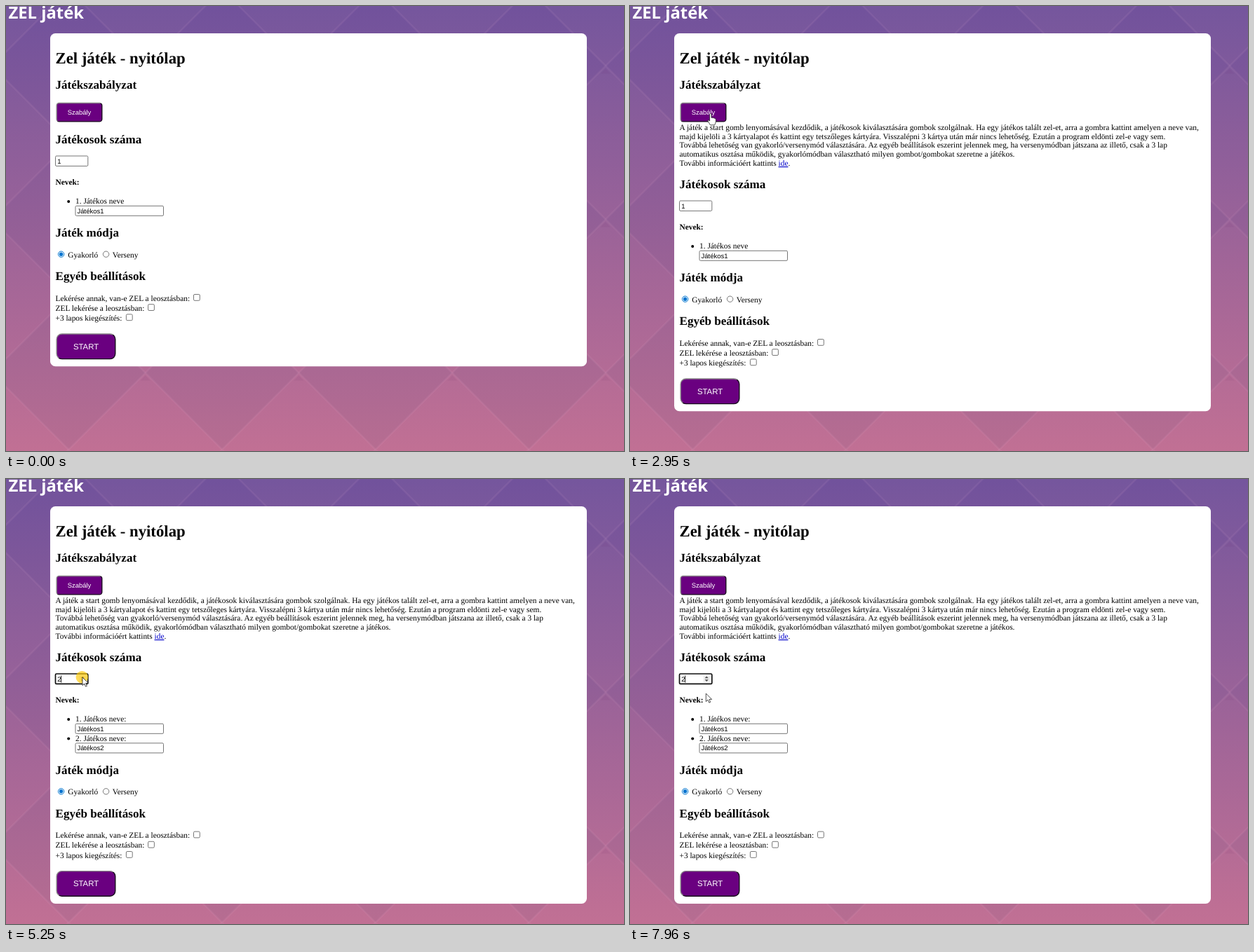
An HTML page that plays this animation: 881x635 px, repeating every 8 s.

```html
<!DOCTYPE html>
<html lang="hu">
<head>
<meta charset="utf-8">
<style>
  html, body { margin: 0; width: 100%; height: 100%; overflow: hidden; background: #91609a; }
  svg { display: block; width: 100vw; height: 100vh; text-rendering: geometricPrecision; }
  text { font: 11.38px "Liberation Serif", "Times New Roman", serif; white-space: pre; }
  .title { font: 700 23.8px "Open Sans", sans-serif; fill: #fff; }
  .h1 { font-size: 22.75px; font-weight: 700; }
  .h2 { font-size: 17.07px; font-weight: 700; }
  .bold { font-weight: 700; }
  .ui { font: 9.48px "Liberation Sans", Arial, sans-serif; }
  .cap { fill: #fff; text-anchor: middle; }
  .big { font-size: 11.38px; }
  .link { fill: #0000c8; text-decoration: underline; }
  .field { fill: #fff; stroke: #767676; }
</style>
</head>
<body>
<svg id="stage" viewBox="0 0 881 635" preserveAspectRatio="none">
  <defs>
    <linearGradient id="sky" gradientUnits="userSpaceOnUse" x1="0" y1="0" x2="0" y2="635">
      <stop stop-color="#71529c"/><stop offset="1" stop-color="#b76d91"/>
    </linearGradient>
    <linearGradient id="facet" gradientUnits="userSpaceOnUse" x1="0" y1="0" x2="0" y2="635">
      <stop stop-color="#75569d"/><stop offset="1" stop-color="#c17094"/>
    </linearGradient>
    <linearGradient id="outset" x2="1" y2="1">
      <stop offset=".5" stop-color="#858085"/><stop offset=".5" stop-color="#180a1c"/>
    </linearGradient>
    <linearGradient id="inset" x2="1" y2="1">
      <stop offset=".5" stop-color="#180a1c"/><stop offset=".5" stop-color="#858085"/>
    </linearGradient>
  </defs>
  <rect width="881" height="635" fill="url(#sky)"/>
  <g id="facets"></g>
  <rect id="card" x="63" y="39" width="765" rx="7.5" fill="#fff"/>
  <g id="head"></g>
  <g id="rules"></g>
  <g id="players"></g>
  <g id="options"></g>
  <circle id="ring" r="8.8" fill="#ffc800" fill-opacity=".66"/>
  <g id="pointer">
    <path id="arrow" d="M0 0V11.6L2.7 9.1 4.5 13.2 6.4 12.4 4.7 8.4H8.3Z" fill="#fff" stroke="#222" stroke-width=".8"/>
    <path id="hand" d="M-1.2 1Q0-.6 1.2 1V6.5Q2.5 5.6 3.4 6.8 4.8 6 5.6 7.4 7.4 6.8 7.6 9V12Q7 14 6 16.8H-.5Q-1.5 14.5-4 11-4.2 8.8-1.2 11Z" fill="#fff" stroke="#222" stroke-width=".8"/>
    <path id="beam" d="M-2.5-5.5H2.5M0-5.5V5.5M-2.5 5.5H2.5" fill="none" stroke="#222"/>
  </g>
</svg>
<script>
const LOOP = 8000, RULES_SHIFT = 64, ROW = 27.6;
const $ = id => document.getElementById(id);

function add(parent, tag, attrs, content = '') {
  const el = document.createElementNS('http://www.w3.org/2000/svg', tag);
  for (const key in attrs) el.setAttribute(key, attrs[key]);
  el.textContent = content;
  return parent.appendChild(el);
}
const label = (parent, x, y, content, cls = '') => add(parent, 'text', { x, y, class: cls }, content);
const box = (parent, x, y, width, height, rx = 1.5) =>
  add(parent, 'rect', { x, y, width, height, rx, class: 'field' });

function button(parent, x, y, width, height, rx, caption, cls) {
  const face = add(parent, 'rect', { x, y, width, height, rx, fill: '#6a0080', stroke: 'url(#outset)', 'stroke-width': 1.4 });
  label(parent, x + width / 2, y + height / 2 + (cls ? 4.1 : 3.5), caption, 'ui cap ' + cls);
  return face;
}

// Background lattice
for (let cx = -20; cx < 990; cx += 218.7) {
  for (let cy = -24; cy < 700; cy += 219) {
    const h = 109.5;
    add($('facets'), 'path', {
      d: `M${cx} ${cy - h}l${h} ${h}l${-h} ${h}l${-h} ${-h}z`,
      fill: 'url(#facet)', stroke: '#ffc0d8', 'stroke-opacity': .07, 'stroke-width': 2.5
    });
    add($('facets'), 'path', { d: `M${cx} ${cy - h + 4}l7 7h-14z`, fill: '#602060', 'fill-opacity': .07 });
  }
}

// Fixed top part
const head = $('head');
label(head, 3.5, 18, 'ZEL játék', 'title');
label(head, 70.5, 82, 'Zel játék - nyitólap', 'h1');
label(head, 70.5, 118, 'Játékszabályzat', 'h2');
const ruleButton = button(head, 72.2, 138.5, 64.6, 26.4, 3.5, 'Szabály', '');

// Rules paragraph
[
  'A játék a start gomb lenyomásával kezdődik, a játékosok kiválasztására gombok szolgálnak. Ha egy játékos talált zel-et, arra a gombra kattint amelyen a neve van,',
  'majd kijelöli a 3 kártyalapot és kattint egy tetszőleges kártyára. Visszalépni 3 kártya után már nincs lehetőség. Ezután a program eldönti zel-e vagy sem.',
  'Továbbá lehetőség van gyakorló/versenymód választására. Az egyéb beállítások eszerint jelennek meg, ha versenymódban játszana az illető, csak a 3 lap',
  'automatikus osztása működik, gyakorlómódban választható milyen gombot/gombokat szeretne a játékos.',
  'További információért kattints '
].forEach((line, i) => {
  const row = label($('rules'), 70.5, 176.8 + 12.8 * i, line);
  if (i === 4) {
    add(row, 'tspan', { class: 'link' }, 'ide');
    add(row, 'tspan', {}, '.');
  }
});

// Player count and names
const players = $('players');
label(players, 70.5, 196, 'Játékosok száma', 'h2');
const countBox = box(players, 70.5, 214, 46.3, 14.4);
const spinner = add(players, 'g', {});
add(spinner, 'rect', { x: 104.5, y: 216, width: 9.5, height: 10.5, fill: '#efefef' });
add(spinner, 'path', { d: 'M106.5 220.3l2.7-2.8 2.7 2.8zM106.5 222.3l2.7 2.8 2.7-2.8z', fill: '#505050' });
const count = label(players, 73.2, 224.6, '1', 'ui');
const caret = add(players, 'path', { d: 'M78.6 216.5v10', stroke: '#000', 'stroke-width': .9 });
label(players, 70.5, 254.5, 'Nevek:', 'bold');
const rows = [1, 2, 3].map(n => {
  const g = add(players, 'g', { transform: `translate(0 ${ROW * (n - 1)})` });
  add(g, 'circle', { cx: 89.2, cy: 279, r: 2 });
  const name = label(g, 99, 282.3, '');
  const field = box(g, 99, 285.3, 125.5, 14);
  label(g, 101.5, 295.6, 'Játékos' + n, 'ui');
  return { g, name, field, n };
});

// Mode, settings and start
const options = $('options');
label(options, 70.5, 329, 'Játék módja', 'h2');
add(options, 'circle', { cx: 78.6, cy: 354.2, r: 4.2, fill: '#fff', stroke: '#0075d0', 'stroke-width': 1 });
add(options, 'circle', { cx: 78.6, cy: 354.2, r: 2.7, fill: '#0075d0' });
label(options, 88.2, 358.7, 'Gyakorló');
add(options, 'circle', { cx: 142.6, cy: 354.2, r: 4.2, class: 'field' });
label(options, 151.8, 358.7, 'Verseny');
label(options, 70.5, 391, 'Egyéb beállítások', 'h2');
[
  ['Lekérése annak, van-e ZEL a leosztásban:', 267.5],
  ['ZEL lekérése a leosztásban:', 202.6],
  ['+3 lapos kiegészítés:', 171.4]
].forEach(([caption, x], i) => {
  label(options, 70.5, 420.6 + 14.2 * i, caption);
  box(options, x, 411.5 + 14.2 * i, 8.8, 8.8);
});
button(options, 72.2, 468, 83.6, 35.6, 7.5, 'START', 'big');

// Pointer path: time, x, y
const path = [
  [450, 815, 621], [1130, 181, 294], [1200, 169.5, 284.5], [1810, 114.8, 153],
  [2950, 114.8, 153], [3570, 119, 240], [4110, 175.8, 293.5], [4230, 177, 294],
  [4300, 124, 288], [4380, 111, 286], [4650, 111, 286], [5050, 109, 283],
  [6300, 109, 283], [6440, 109, 287], [7762, 109, 287], [7960, 108.3, 306], [8001, 108.3, 306]
];
const TICK = 68;

function pointerAt(t) {
  const i = path.findIndex((p, k) => k < path.length - 1 && t < path[k + 1][0]);
  const [t0, x0, y0] = path[i], [t1, x1, y1] = path[i + 1];
  let p = Math.floor((t - t0) / TICK) * TICK / (t1 - t0);
  if (i === 0) p = 1 - (1 - p) ** 2;
  return [x0 + (x1 - x0) * p, y0 + (y1 - y0) * p];
}

const within = (t, ...spans) => spans.some(([a, b]) => t >= a && t < b);
const show = (el, on) => el.setAttribute('display', on ? 'inline' : 'none');
const shift = (el, y) => el.setAttribute('transform', `translate(0 ${y})`);

function render(t) {
  const open = t >= 2820;
  const total = t < 5250 ? 1 : within(t, [5770, 6770]) ? 3 : 2;
  const base = open ? RULES_SHIFT : 0;
  const grow = ROW * (total - 1);
  const focused = t >= 5250;

  $('card').setAttribute('height', 475.3 + base + grow);
  show($('rules'), open);
  shift(players, base);
  shift(options, base + grow);
  ruleButton.setAttribute('stroke', within(t, [2750, 2820]) ? 'url(#inset)' : 'url(#outset)');

  count.textContent = total;
  countBox.style.stroke = focused ? '#101010' : t >= 4380 ? '#555' : '';
  countBox.style.strokeWidth = focused ? 1.7 : 1;
  show(spinner, t >= 4380);
  show(caret, within(t, [5250, 6300], [6770, 7300], [7830, LOOP]));
  for (const { g, name, field, n } of rows) {
    show(g, n <= total);
    name.textContent = `${n}. Játékos neve${focused ? ':' : ''}`;
    field.style.stroke = n === 1 && within(t, [1130, 1270]) ? '#4c4c4c' : '';
  }

  const moving = t >= 450;
  show($('pointer'), moving);
  const pressed = within(t, [2750, 2950], [5250, 5310], [5770, 5970], [6770, 6900]);
  show($('ring'), pressed);
  if (!moving) return;
  const [x, y] = pointerAt(t);
  $('pointer').setAttribute('transform', `translate(${x} ${y})`);
  $('ring').setAttribute('cx', x - .6);
  $('ring').setAttribute('cy', y - .2);
  const beam = within(t, [1130, 1270]), hand = within(t, [1740, 3020]);
  show($('beam'), beam);
  show($('hand'), hand);
  show($('arrow'), !beam && !hand);
}

const start = performance.now();
function loop() {
  render((performance.now() - start) % LOOP);
  requestAnimationFrame(loop);
}
render(0);
requestAnimationFrame(loop);
</script>
</body>
</html>
```
